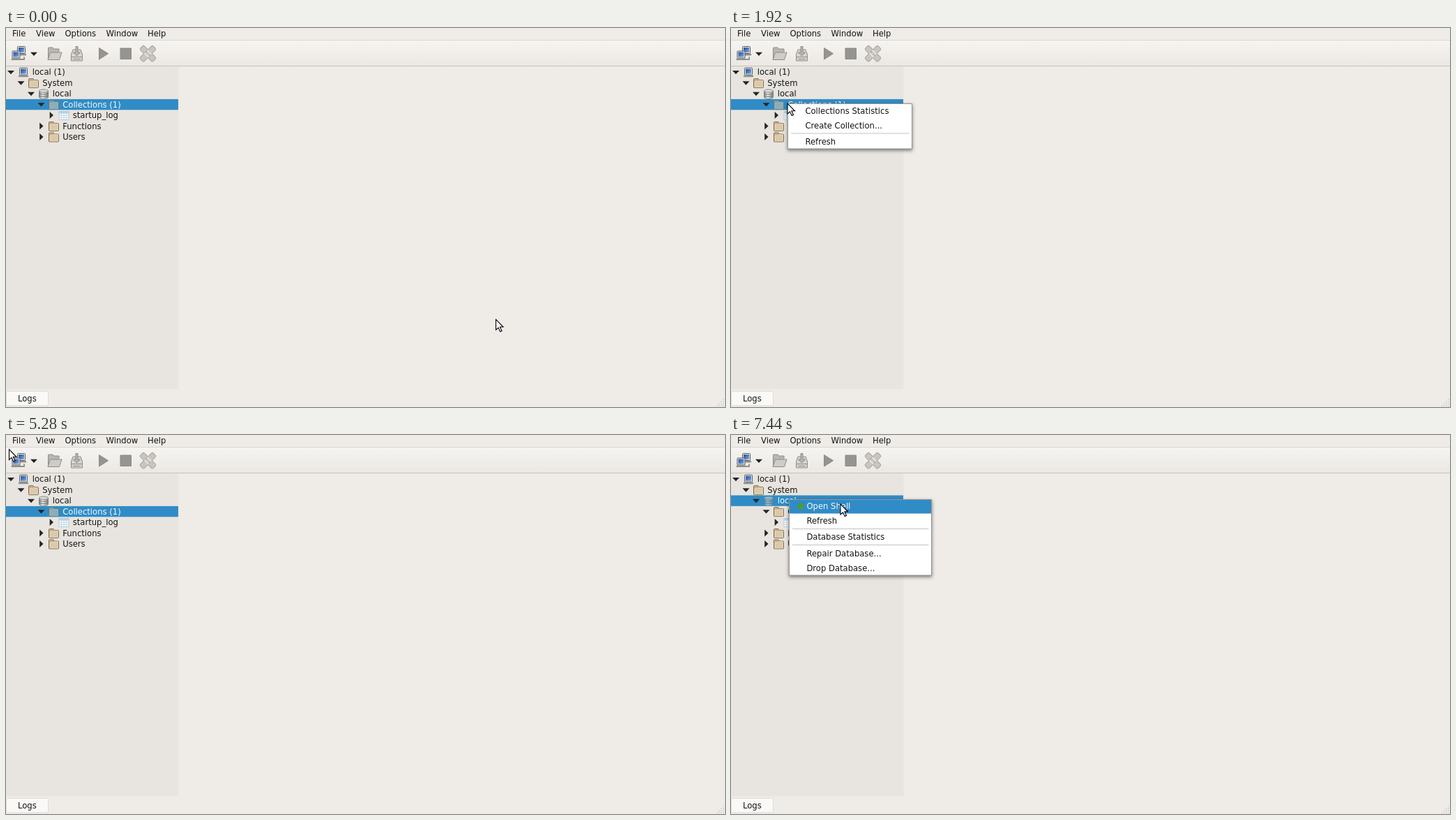
Animation, 1031 px wide and 543 px high, one loop 8000 ms. Source, as an HTML page:

```html
<!DOCTYPE html>
<html lang="en">
<head>
<meta charset="utf-8">
<title>Database tree</title>
<style>
html, body { margin: 0; width: 100%; height: 100%; overflow: hidden; background: #efebe7; }
svg { display: block; width: 100%; height: 100%; }
text { font: 11.6px "DejaVu Sans", sans-serif; fill: #141414; }
.on text { fill: #f4f9fc; }
.on .icon { opacity: .55; }
.menu { filter: drop-shadow(0 2px 2.5px rgba(0, 0, 0, .5)); }
</style>
</head>
<body>
<svg id="stage" viewBox="0 0 1031 543">
  <defs>
    <linearGradient id="bar" x2="0" y2="1"><stop stop-color="#f6f4f1"/><stop offset="1" stop-color="#ebe8e3"/></linearGradient>
    <linearGradient id="blue" x2="1" y2="1"><stop stop-color="#1f4b9c"/><stop offset="1" stop-color="#7da8e6"/></linearGradient>
    <linearGradient id="metal"><stop stop-color="#8b8b89"/><stop offset=".4" stop-color="#f0f0ee"/><stop offset="1" stop-color="#858583"/></linearGradient>
    <g id="screen">
      <rect x="-5.5" y="-6.5" width="11" height="10" rx="1" fill="#eeeeec" stroke="#555753"/>
      <rect x="-4" y="-5" width="8" height="7" fill="url(#blue)"/>
      <path d="M-6.5 6V4.5H6.5V6Z" fill="#d3d7cf" stroke="#666" stroke-width=".8"/>
    </g>
    <g id="folder">
      <path d="M-7 5.5V-5.5Q-7-6.5-6-6.5H-.5L1-4.5H6Q7-4.5 7-3.5V5.5Q7 6.5 6 6.5H-6Q-7 6.5-7 5.5Z" fill="#c9b08c" stroke="#806a4c"/>
      <path d="M-5.5 5.5V-2.5H-1L.5-3.7H6V5.5Z" fill="#dcc9aa" stroke="#eadfca" stroke-width=".8"/>
    </g>
    <g id="disk" fill="url(#metal)" stroke="#7d7d7b" stroke-width=".8">
      <path d="M-6.5-4.5V4.5C-6.5 7.5 6.5 7.5 6.5 4.5V-4.5Z"/>
      <path d="M-6.5-1.5C-6.5 1.2 6.5 1.2 6.5-1.5M-6.5 1.7C-6.5 4.4 6.5 4.4 6.5 1.7" fill="none" stroke="#555"/>
      <ellipse cy="-4.5" rx="6.5" ry="2.2" fill="#d9d9d7"/>
    </g>
    <g id="table">
      <rect x="-7" y="-6" width="14" height="12" fill="#f8fbfd" stroke="#a9c3d6" stroke-width=".8"/>
      <rect x="-7" y="-6" width="14" height="3" fill="#b4d2e8"/>
      <path d="M-7-.2H7M-7 2.8H7M-3.5-6V6M0-6V6M3.5-6V6" stroke="#bdd2e0" stroke-width=".8"/>
    </g>
    <path id="down" d="M-5-2.3H5L0 3Z" fill="#242424"/>
    <path id="right" d="M-2.3-5V5L3 0Z" fill="#242424"/>
  </defs>

  <rect width="1031" height="543" fill="#efebe7"/>
  <rect y="18" width="1031" height="36" fill="url(#bar)"/>
  <path d="M0 17.5H1031" stroke="#d9d6d1"/>
  <path d="M0 54.5H1031" stroke="#c5c1bc"/>
  <rect y="55" width="247.5" height="462.5" fill="#e8e5e0"/>
  <rect x=".5" y="520.5" width="60" height="20.5" rx="1.5" fill="#faf9f7" stroke="#dfdbd6"/>
  <g id="labels"></g>

  <use href="#screen" x="22" y="33"/>
  <use href="#screen" x="14.5" y="39.5"/>
  <path d="M21 45H26V41.5" fill="none" stroke="#8f918d" stroke-width="2"/>
  <use href="#down" x="40" y="37"/>
  <g stroke="#8c8a87" stroke-linejoin="round">
    <path d="M60.5 45V29Q60.5 28 61.5 28H67L68.500 30H76V34" fill="#bab7b3"/>
    <path d="M60 45.500L63.500 35H80L76.500 45.500Z" fill="#cfccc8"/>
    <path d="M93.500 38L96 31H107L109.500 38V47H93.500Z" fill="#d8d5d1"/>
    <path d="M94 41.500H109M96 44.500H107" fill="none"/>
    <path d="M100 26.500H103V35H106.500L101.500 40L96.500 35H100Z" fill="#b8b5b1"/>
    <path d="M133.500 28.500V45L146.500 36.700Z" fill="#969491"/>
    <rect x="164" y="29" width="15.500" height="15.500" fill="#969491"/>
  </g>
  <g transform="translate(203.500 36.700)" fill="#c9c6c2" stroke="#a6a39f">
    <rect x="-13" y="-4" width="26" height="8" rx="2" transform="rotate(45)"/>
    <rect x="-13" y="-4" width="26" height="8" rx="2" transform="rotate(-45)"/>
    <path d="M-5-1L1 5M-1-5L5 1" stroke="#e6e3df" stroke-width="2"/>
  </g>
  <g id="grip" fill="#c4c0bb"></g>
  <g id="tree"></g>
  <g id="menus"></g>
  <path id="cursor" d="M.5 .7V15.500L4 12.300L6.700 18L9 17L6.400 11.300H11Z" fill="#fff" stroke="#000" stroke-width="1.100"/>
</svg>
<script>
const $ = id => document.getElementById(id);
const label = (x, y, s) => `<text x="${x}" y="${y + 4.2}">${s}</text>`;
const box = (x, y, w, h, more) => `<rect x="${x}" y="${y}" width="${w}" height="${h}" ${more}/>`;

$('labels').innerHTML = [[9, 'File'], [43, 'View'], [84.4, 'Options'], [143.5, 'Window'], [203, 'Help']]
  .map(([x, s]) => label(x, 8.2, s)).join('') + label(17, 531.2, 'Logs');

for (let i = 0; i < 4; i++)
  for (let j = 0; j <= i; j++) $('grip').innerHTML += box(1028 - 3 * j, 531.5 + 3 * i, 1.3, 1.3, '');

// depth, icon, caption, arrow
const rows = [
  [0, 'screen', 'local (1)', 'down'], [1, 'folder', 'System', 'down'], [2, 'disk', 'local', 'down'],
  [3, 'folder', 'Collections (1)', 'down'], [4, 'table', 'startup_log', 'right'],
  [3, 'folder', 'Functions', 'right'], [3, 'folder', 'Users', 'right']
];
function drawTree(selected) {
  $('tree').innerHTML = rows.map(([depth, icon, name, arrow], i) => {
    const x = 14.5 * depth, y = 63.2 + 15.47 * i, on = i === selected;
    return `<g class="${on ? 'on' : ''}">` + (on ? box(0, y - 7.7, 247, 15.4, 'fill="#308cc6"') : '') +
      `<use href="#${arrow}" x="${x + 7}" y="${y}"/>` +
      `<use class="icon" href="#${icon}" x="${x + 25}" y="${y + .5}"/>` +
      label(x + 37.7, y, name) + '</g>';
  }).join('');
}

const menus = {
  collections: { x: 81.5, y: 108.5, w: 178, h: 64.5, lines: [151],
    items: [[118.3, 'Collections Statistics'], [139.7, 'Create Collection...'], [162.5, 'Refresh']] },
  database: { x: 83.5, y: 92.5, w: 204, h: 108.5, lines: [134.5, 157.5], dot: true,
    items: [[102, 'Open Shell'], [123.2, 'Refresh'], [146.2, 'Database Statistics'],
      [169.5, 'Repair Database...'], [190.7, 'Drop Database...']] }
};
function drawMenu(name, hover) {
  const m = menus[name];
  $('menus').innerHTML = !m ? '' :
    `<g class="menu">${box(m.x, m.y, m.w, m.h, 'fill="#fff" stroke="#979797"')}</g>` +
    (hover ? box(m.x + .5, m.y + .5, m.w - 1, 19.5, 'fill="#308cc6"') : '') +
    m.lines.map(y => `<path d="M${m.x + 4.5} ${y}H${m.x + m.w - 4}" stroke="#c3c3c3"/>`).join('') +
    (m.dot ? '<circle cx="100" cy="102" r="4.5" fill="#499c38"/>' : '') +
    m.items.map(([y, s], i) => `<g class="${hover && !i ? 'on' : ''}">${label(m.x + 24.9, y, s)}</g>`).join('');
}

// start time, then one pointer position per 120 ms tick; null hides it
const moves = [
  [0, [702, 417]],
  [360, [520, 325], [116, 128], null],
  [840, [22, 67], [38, 78], [55, 90], [70, 101], [80.500, 107.500]],
  [2760, [68, 107], [54, 106], [42, 104]],
  [3360, [28, 82], [13, 53], [0, 28], [3, 12], [6, 5.500]],
  [4440, [12, 5]],
  [5280, [4, 20], [22, 62], [52, 97], [76, 108], [82.500, 92]],
  [7080, [95, 96], [115, 98], [138, 99], [156.500, 98.500]]
];
function pointerAt(t) {
  const [start, ...path] = moves.filter(m => m[0] <= t).pop();
  return path[Math.min(path.length - 1, Math.floor((t - start) / 120))];
}

let shown;
function frame() {
  const t = performance.now() % 8000;
  const menu = t >= 6120 ? 'database' : t >= 1920 && t < 2760 ? 'collections' : '';
  const hover = t >= 7080;
  if (shown !== menu + hover) {
    shown = menu + hover;
    drawTree(menu === 'database' ? 2 : 3);
    drawMenu(menu, hover);
  }
  const p = pointerAt(t);
  $('cursor').setAttribute('visibility', p ? 'visible' : 'hidden');
  if (p) $('cursor').setAttribute('transform', `translate(${p})`);
  requestAnimationFrame(frame);
}
frame();
</script>
</body>
</html>
```
